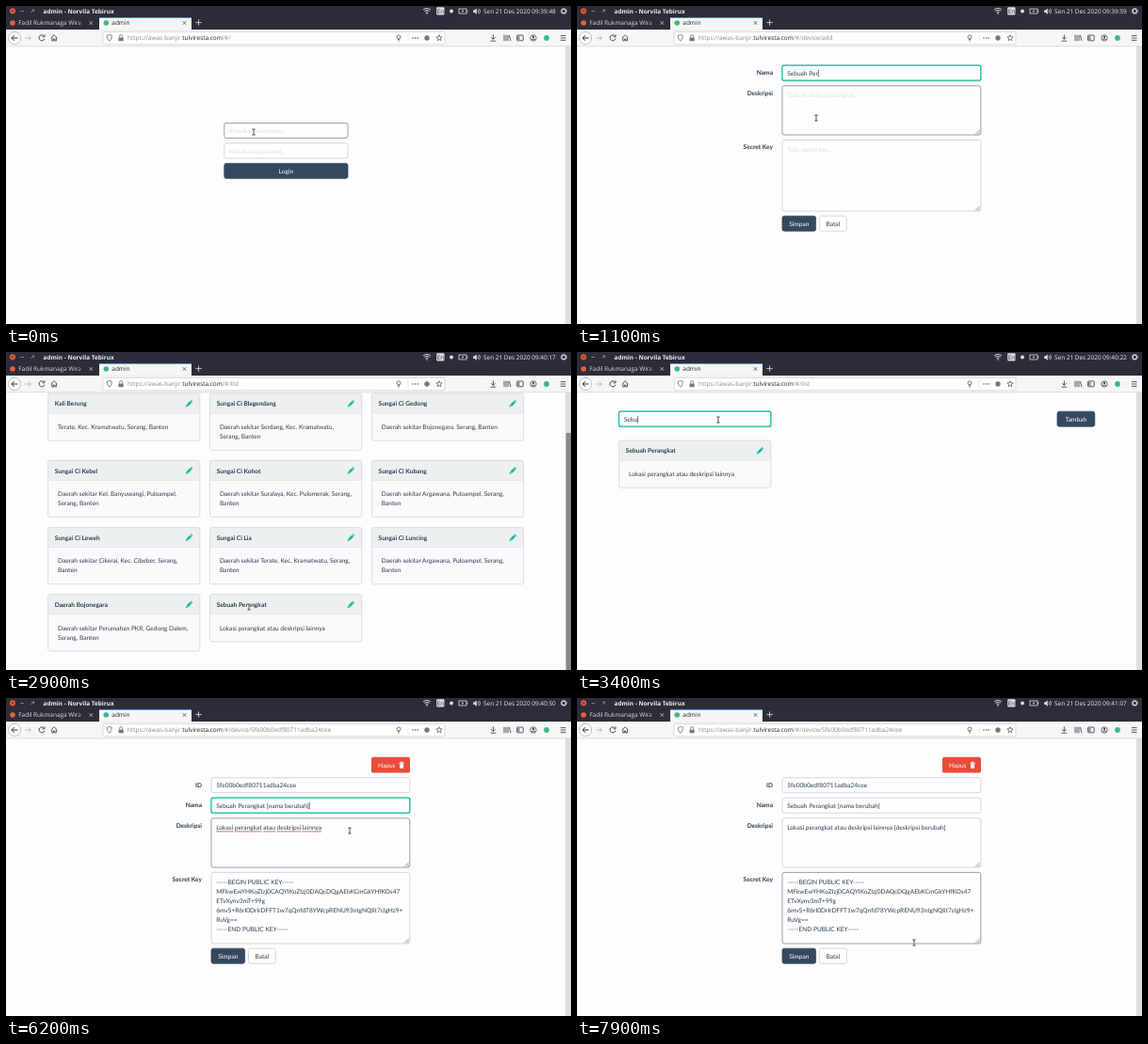
Recreate the animation shown at these times as an HTML page. Size 600x338 px, loop 8000 ms.

```html
<!DOCTYPE html>
<html lang="id">
<head>
<meta charset="utf-8">
<title>admin</title>
<style>
html, body { margin: 0; width: 100%; height: 100%; overflow: hidden; background: #fdfcfe; }
svg { display: block; width: 600px; height: 338px; }
text { font: 6.6px Lato, sans-serif; fill: #2c3e50; white-space: pre; text-rendering: geometricPrecision; }
.ui { font: 6.45px "Open Sans", "Noto Sans", sans-serif; }
.bold { font-weight: 700; }
</style>
</head>
<body>
<svg viewBox="0 0 600 338"><g id="page"></g><g id="chrome"></g><g id="mouse"></g></svg>
<script>
const LOOP = 8000, STEP = 100;
const INK = '#2c3e50', NAVY = '#34495e', TEAL = '#1abc9c', RED = '#e74c3c', BAR = '#2d2c38', ICON = '#4a4a52';
const HOST = ['https://awas-banjir.', 'tulviresta.com'];
const ID = '5fe00b0edf80711adba24cee';
const NAME = 'Sebuah Perangkat', DESC = 'Lokasi perangkat atau deskripsi lainnya';
const NAME_NEW = NAME + ' [nama berubah]', DESC_NEW = DESC + ' [deskripsi berubah]';
const KEY = ['-----BEGIN PUBLIC KEY-----',
  'MFkwEwYHKoZIzj0CAQYIKoZIzj0DAQcDQgAEbKCmGkYHfKOs47',
  'ETvXynv3mT+99g',
  '6mvS+R6rI0DrIrDFFT1w7qQnfd78YWcpRENU93ntgNQIit7clgHz9+',
  'RuVg==', '-----END PUBLIC KEY-----'].join('\n');

const CARDS = [
  ['Kali Berung', 'Terate, Kec. Kramatwatu, Serang, Banten'],
  ['Sungai Ci Blagendang', 'Daerah sekitar Serdang, Kec. Kramatwatu,\nSerang, Banten'],
  ['Sungai Ci Gedong', 'Daerah sekitar Bojonegara, Serang, Banten'],
  ['Sungai Ci Kebel', 'Daerah sekitar Kel. Banyuwangi, Puloampel,\nSerang, Banten'],
  ['Sungai Ci Kohot', 'Daerah sekitar Suralaya, Kec. Pulomerak, Serang,\nBanten'],
  ['Sungai Ci Kubang', 'Daerah sekitar Argawana, Puloampel, Serang,\nBanten'],
  ['Sungai Ci Leweh', 'Daerah sekitar Cikerai, Kec. Cibeber, Serang,\nBanten'],
  ['Sungai Ci Lia', 'Daerah sekitar Terate, Kec. Kramatwatu, Serang,\nBanten'],
  ['Sungai Ci Luncing', 'Daerah sekitar Argawana, Puloampel, Serang,\nBanten'],
  ['Daerah Bojonegara', 'Daerah sekitar Perumahan PKR, Gedong Dalem,\nSerang, Banten']
];

// Pointer path: time, x, y
const PATH = [[0, 263, 134], [400, 263, 134], [600, 297, 176], [700, 297, 176], [800, 526, 72],
  [900, 400, 90], [1000, 254, 119], [2400, 254, 119], [2500, 236, 232], [2700, 240, 236],
  [2900, 258, 271], [3100, 258, 271], [3200, 150, 72], [3600, 150, 72], [3800, 194, 103],
  [4500, 194, 103], [4800, 300, 220], [5000, 236, 274], [5200, 345, 150], [5500, 345, 150],
  [5700, 365, 115], [5900, 365, 115], [6000, 365, 141], [6700, 365, 141], [6900, 236, 274],
  [7100, 300, 270], [7300, 366, 268], [7500, 366, 268], [7700, 358, 260], [8000, 358, 260]];

const pen = document.createElement('canvas').getContext('2d');
const measure = s => { pen.font = '66px Lato, sans-serif'; return pen.measureText(s).width / 10; };
const esc = s => s.replace(/&/g, '&amp;').replace(/</g, '&lt;');
const clamp = v => Math.min(1, Math.max(0, v));
const ramp = (t, a, b) => clamp((t - a) / (b - a));
const typed = (s, t, a, b) => s.slice(0, Math.round(s.length * ramp(t, a, b)));

const rect = (x, y, w, h, fill, extra = '') =>
  `<rect x="${x}" y="${y}" width="${w}" height="${h}" fill="${fill}" ${extra}/>`;
const text = (s, x, y, extra = '') => `<text x="${x}" y="${y}" ${extra}>${esc(s)}</text>`;
const line = (d, stroke = ICON, w = 0.9, extra = '') =>
  `<path d="${d}" fill="none" stroke="${stroke}" stroke-width="${w}" ${extra}/>`;
const shape = (d, fill, extra = '') => `<path d="${d}" fill="${fill}" ${extra}/>`;
const dot = (x, y, r, fill, extra = '') => `<circle cx="${x}" cy="${y}" r="${r}" fill="${fill}" ${extra}/>`;
const cross = (x, y, r, c, w) => line(`M${x - r} ${y - r}l${2 * r} ${2 * r}m0 ${-2 * r}l${-2 * r} ${2 * r}`, c, w);

let mouse = { x: 0, y: 0 }, overField = false;

function pointerAt(t) {
  const i = Math.max(1, PATH.findIndex(p => p[0] > t));
  const [a, b] = [PATH[i - 1], PATH[i]], k = ramp(t, a[0], b[0]);
  return { x: a[1] + (b[1] - a[1]) * k, y: a[2] + (b[2] - a[2]) * k };
}

function field({ x, y, w, h, value = '', hint = '', focus, spell, grip }) {
  const hover = mouse.x > x && mouse.x < x + w && mouse.y > y && mouse.y < y + h;
  overField = overField || hover;
  let out = focus ? rect(x, y, w, h, 'none', `rx="2.2" stroke="${TEAL}" stroke-opacity=".25" stroke-width="2.6"`) : '';
  out += rect(x, y, w, h, '#fefdff',
    `rx="2" stroke="${focus ? TEAL : hover ? '#7f8a93' : '#c9ced3'}" stroke-width="${focus ? 1.2 : 0.8}"`);
  const base = y + (grip ? 12.5 : 10.7), lines = value.split('\n');
  if (!value && hint) out += text(hint, x + 5.2, base, 'style="fill:#dcdee2"');
  lines.forEach((s, i) => out += text(s, x + 5.2, base + i * 9.95));
  if (spell) {
    let from = 0;
    for (const word of value.split(' ')) {
      const left = x + 5.2 + measure(value.slice(0, from));
      if (word) out += line(`M${left} ${base + 1.6}h${measure(word)}`, '#e0303a', 0.9, 'stroke-dasharray="1.5 .35"');
      from += word.length + 1;
    }
  }
  if (focus) {
    const cx = x + 5.6 + measure(lines[lines.length - 1]);
    out += line(`M${cx} ${base - 6 + (lines.length - 1) * 9.95}v7.6`, '#222', 0.6);
  }
  if (grip) out += line(`M${x + w - 1} ${y + h - 5.5}l-5 5M${x + w - 1} ${y + h - 3.6}l-3 3M${x + w - 1} ${y + h - 1.8}l-1.2 1.2`, '#8b8b90', 0.7);
  return out;
}

const button = (s, x, y, w, fill, ink = '#fff', border = fill) =>
  rect(x, y, w, 16, fill, `rx="2.2" stroke="${border}" stroke-width=".8"`) +
  text(s, x + w / 2, y + 10.8, `text-anchor="middle" style="fill:${ink}"`);
const label = (s, y) => text(s, 208, y, 'class="bold" text-anchor="end"');

function loginPage(t) {
  const box = { x: 231.8, w: 131.2, h: 16 };
  return field({ ...box, y: 124.4, hint: 'Masukan username...', value: typed('admin', t, 100, 300), focus: t >= 100 && t < 400 }) +
    field({ ...box, y: 145.9, hint: 'Masukan password...', value: typed('••••••••', t, 400, 600), focus: t >= 400 }) +
    button('Login', 231.8, 167.3, 131.2, NAVY);
}

function formRows(top, f) {
  const box = { x: 218, w: 210.8 };
  return label('Nama', top + 10) +
    field({ ...box, y: top, h: 16, hint: 'Tulis nama perangkat...', value: f.name, focus: f.focus === 'name' }) +
    label('Deskripsi', top + 31.4) +
    field({ ...box, y: top + 21.6, h: 52.2, hint: 'Tulis deskripsi perangkat...', value: f.desc, focus: f.focus === 'desc', spell: f.spell, grip: true }) +
    label('Secret Key', top + 89) +
    field({ ...box, y: top + 79.2, h: 75.6, hint: 'Tulis secret key...', value: f.key, focus: f.focus === 'key', grip: true }) +
    button('Simpan', 218, top + 160, 35.6, NAVY) +
    button('Batal', 257.4, top + 160, 29, '#fefdff', INK, '#c9ced3');
}

function addPage(t) {
  return formRows(63.2, {
    name: typed(NAME, t, 900, 1220), desc: typed(DESC, t, 1300, 2100), key: t >= 2400 ? KEY : '',
    focus: t < 1000 ? '' : t < 1300 ? 'name' : t < 2200 ? 'desc' : t < 2600 ? 'key' : '',
    spell: t >= 1300
  });
}

function devicePage(t) {
  const again = t >= 7500, loaded = again ? t >= 7600 : t >= 4400;
  const trash = shape('M417.4 68.7h5.4v1h-5.4zM418.9 67.8h2.4v1h-2.4zM417.9 70.2h4.4l-.4 4.6h-3.6z', '#fff');
  const editing = !again && t >= 5300;
  return rect(388, 62.8, 41, 16.8, RED, 'rx="2.2"') + text('Hapus', 395, 73.8, 'style="fill:#fff"') + trash +
    label('ID', 94.7) + field({ x: 218, y: 84.7, w: 210.8, h: 16, value: ID }) +
    formRows(106.2, {
      name: !loaded ? '' : again ? NAME_NEW : NAME + typed(' [nama berubah]', t, 5800, 6150),
      desc: !loaded ? '' : again ? DESC_NEW : DESC + typed(' [deskripsi berubah]', t, 6350, 6800),
      key: loaded ? KEY : '', spell: editing,
      focus: !editing ? '' : t < 5700 ? 'desc' : t < 6300 ? 'name' : t < 6900 ? 'desc' : ''
    });
}

function card([title, body], x, y) {
  const lines = body.split('\n'), h = 50.3 + (lines.length - 1) * 10;
  const pencil = `<g transform="translate(${x + 149.5} ${y + 11.2}) rotate(45) scale(1.1)">` +
    rect(-1.2, -2.9, 2.4, 5, TEAL) + rect(-1.2, -4.3, 2.4, 1, TEAL) + shape('M-1.2 2.4h2.4l-1.2 2z', TEAL) + '</g>';
  return rect(x, y, 161.2, h, '#fbf9fc', 'rx="2"') + rect(x, y, 161.2, 21.2, '#ecf0f1', 'rx="2"') +
    rect(x, y, 161.2, h, 'none', 'rx="2" stroke="#d3d8dc" stroke-width=".8"') +
    line(`M${x} ${y + 21.2}h161.2`, '#dde1e4', 0.6) +
    text(title, x + 7.2, y + 13.3, 'class="bold"') + pencil +
    lines.map((s, i) => text(s, x + 10.4, y + 38 + i * 10)).join('');
}

function listPage(t) {
  const query = t > 3000 && t < 4200 ? typed('Sebuah', t, 3200, 3500) : '';
  const all = CARDS.slice();
  if (t >= 7000) all.push([NAME_NEW, DESC + ' [deskripsi\nberubah]']);
  else if (t >= 2700) all.push([NAME, DESC]);
  const shown = all.filter(c => c[0].startsWith(query));
  let scroll = 0;
  if (t >= 2700 && t < 4200) scroll = 50 * (ramp(t, 2700, 2900) - ramp(t, 3000, 3200));
  if (t >= 7000) scroll = 50 * ramp(t, 7000, 7200);
  const top = 94 - scroll;
  const content = field({ x: 44.6, y: 63.2 - scroll, w: 161.2, h: 16, hint: 'Cari perangkat...', value: query, focus: t >= 3200 && t < 4200 }) +
    button('Tambah', 510, 63.2 - scroll, 39.8, NAVY) +
    shown.map((c, i) => card(c, 44.6 + (i % 3) * 171.9, top + Math.floor(i / 3) * 71.2)).join('');
  const thumb = shown.length > 9 ? rect(594.7, 43 + scroll * 0.86, 5.3, 252, '#88888b', 'rx="1"') : '';
  return { content, thumb };
}

function route(t) {
  if (t < 700) return ['login', ''];
  if (t < 900 || t >= 2700 && t < 4100 || t >= 7000 && t < 7500) return ['list', 'list'];
  if (t < 2700) return ['add', 'device/add'];
  return ['device', 'device/' + ID];
}

function topPanel(t) {
  const clock = new Date(Date.UTC(2020, 11, 21, 9, 39, 48) + t * 10).toISOString().slice(11, 19);
  const pale = '#dcdbe0', white = 'style="fill:#eceaf0"';
  const arc = r => `M${447 - r} ${8 - r}q${r} ${-r * 0.8} ${2 * r} 0`;
  return rect(0, 0, 600, 25.5, BAR) +
    dot(7, 5.3, 3.1, '#e2583e') + cross(7, 5.3, 1.1, '#5b2118', 0.7) +
    line('M15.5 5.5h3.4M26.5 7l3-3m-2 0h2v2', '#a9a8b0', 0.7) +
    text('admin - Norvila Tebirux', 39.5, 7.7, `class="ui bold" ${white}`) +
    line(arc(1.4) + arc(2.7) + arc(4), pale, 0.9) + dot(447, 8, 0.8, pale) +
    rect(457.2, 1.2, 8.3, 8.4, pale, 'rx="1"') + text('En', 461.4, 7.6, 'class="ui" text-anchor="middle"') +
    dot(473, 5.5, 2, pale) +
    rect(481, 3, 8, 5, 'none', `stroke="${pale}" stroke-width=".8"`) + rect(489.2, 4.4, 1, 2.2, pale) + shape('M485.6 3.6l-2 2.2h1.3l-.6 1.8 2-2.4h-1.2z', pale) +
    shape('M496.2 4.3h1.6l2-1.9v6.6l-2-1.9h-1.6z', pale) + line('M501 4q1.2 1.6 0 3.2M502.4 2.8q2.4 2.8 0 5.6', pale, 0.8) +
    text('Sen 21 Des 2020 ' + clock, 507, 7.7, `class="ui" ${white}`) +
    dot(592.3, 5.4, 2.1, 'none', `stroke="${pale}" stroke-width="1.1"`) +
    dot(592.3, 5.4, 3.1, 'none', `stroke="${pale}" stroke-width="1" stroke-dasharray="1.22"`);
}

function tabs() {
  return dot(7, 18, 2.8, '#e8603a') +
    '<defs><linearGradient id="fade" x1="0" x2="1"><stop offset="0" stop-color="#2d2c38" stop-opacity="0"/><stop offset="1" stop-color="#2d2c38"/></linearGradient></defs>' +
    text('Fadil Rukmanaga Wira', 13.3, 20.4, 'class="ui" style="fill:#dad9df"') +
    rect(76, 12, 9, 13, 'url(#fade)') + rect(85, 12, 13, 13, BAR) +
    cross(90.3, 18, 1.8, '#c9c8ce', 0.8) +
    rect(99, 12, 98, 13.6, '#f5f6f7') + rect(99, 12, 98, 0.9, '#3b8ede') +
    dot(106.3, 18, 2.8, '#41b883') + text('admin', 112.3, 20.4, 'class="ui" style="fill:#222228"') +
    cross(189.5, 18, 1.8, ICON, 0.8) + line('M201.4 17.6h6.4M204.6 14.4v6.4', '#d2d1d8', 0.9);
}

function navBar(path) {
  const [sub, host] = HOST;
  const star = Array.from({ length: 10 }, (_, i) => {
    const a = i * Math.PI / 5, r = i % 2 ? 1.5 : 3.3;
    return (460 + r * Math.sin(a)).toFixed(2) + ' ' + (34 - r * Math.cos(a)).toFixed(2);
  }).join('L');
  return rect(0, 25.2, 600, 17.8, '#f5f6f7') + line('M0 42.8h600', '#d2d1d6', 0.7) +
    dot(9, 34, 6.6, '#fdfdfe', 'stroke="#a9a9b0" stroke-width=".7"') + line('M12.5 34h-6.6m2.8-2.8l-2.8 2.8 2.8 2.8', '#333339', 1) +
    line('M20 34h6.4m-2.8-2.8l2.8 2.8-2.8 2.8', '#b6b6bc', 0.9) +
    line('M40.4 32a3 3 0 1 0 .5 2.8M41 30.4v2.4h-2.4', ICON, 1) +
    line('M47.8 34l3.3-3.2 3.3 3.2M48.8 33.4v3.6h1.6v-2h1.4v2h1.6v-3.6', ICON, 0.9) +
    rect(103, 27.4, 363, 13.4, '#fefeff', 'rx="1.5" stroke="#cfcfd4" stroke-width=".7"') +
    line('M107.2 31.4l2.6-1 2.6 1q0 4.2-2.6 6-2.6-1.8-2.6-6z', '#6d6d74', 0.8) +
    rect(119.5, 33.4, 5.2, 3.8, '#77777e', 'rx=".5"') + line('M120.6 33.4v-1.4a1.5 1.5 0 0 1 3 0v1.4', '#77777e', 0.8) +
    `<text class="ui" x="129" y="36.4" style="fill:#8a8a90">${sub}<tspan style="fill:#222228">${host}</tspan>/#/${path}</text>` +
    dot(417, 33, 2, 'none', `stroke="${ICON}" stroke-width=".7"`) + line('M416 35.5h2M416.2 37h1.6', ICON, 0.8) +
    line('M427 30v8', '#dedee2', 0.6) + [432, 434.6, 437.2].map(x => dot(x, 34, 0.75, ICON)).join('') +
    dot(447, 34, 2.7, '#77777e') + line(`M${star}Z`, ICON, 0.7) +
    line('M517.4 30.4v5m-2.2-2.2l2.2 2.2 2.2-2.2M514.6 37.2h5.6', ICON, 0.9) +
    line('M529 30.8v6.4M531 30.8v6.4M533 30.8v6.4M534.4 31l1.6 6.2', ICON, 0.9) +
    rect(542.6, 31, 6.6, 5.8, 'none', `rx=".7" stroke="${ICON}" stroke-width=".9"`) + rect(543, 31.4, 2.6, 5, '#94949b') +
    dot(560, 34, 3.2, 'none', `stroke="${ICON}" stroke-width=".8"`) + dot(560, 33, 1.2, ICON) + line('M558 36q2-2 4 0', ICON, 0.9) +
    dot(574, 34, 2.9, '#41b883') + line('M588.9 31.6h5.6m-5.6 2.4h5.6m-5.6 2.4h5.6', ICON, 0.9);
}

function statusBar() {
  return rect(0, 329, 221.5, 9, '#efeef2') + line('M0 329h221.5v9', '#d6d5da', 0.6) +
    text(HOST.join('') + '/#/device/' + ID, 1.2, 335.8, 'class="ui" style="fill:#85858b"');
}

function pointer(ibeam) {
  const { x, y } = mouse;
  if (!ibeam) return shape(`M${x} ${y - 3}v7.4l1.7-1.6 1.3 2.8 1.2-.6-1.3-2.7h2.3z`, '#111', 'stroke="#fff" stroke-width=".5"');
  const d = `M${x - 1.6} ${y - 3}h3.2M${x} ${y - 3}v6M${x - 1.6} ${y + 3}h3.2`;
  return line(d, '#fff', 1.8) + line(d, '#222', 0.8);
}

const layer = id => document.getElementById(id);
function render(t) {
  mouse = pointerAt(t);
  overField = false;
  const [page, path] = route(t);
  const view = page === 'list' ? listPage(t)
    : { content: { login: loginPage, add: addPage, device: devicePage }[page](t), thumb: '' };
  const hovering = t >= 3800 && t < 4500;
  layer('page').innerHTML = rect(0, 43, 600, 295, '#fdfcfe') + view.content +
    rect(594, 43, 6, 295, '#dfdde1') + view.thumb + (hovering ? statusBar() : '');
  layer('chrome').innerHTML = topPanel(t) + tabs() + navBar(path);
  const onLink = page === 'list' && (hovering || t >= 7300 || t === 800);
  layer('mouse').innerHTML = pointer(overField || page === 'list' && !onLink);
}

let last = -1;
function tick() {
  const t = Math.floor(performance.now() % LOOP / STEP) * STEP;
  if (t !== last) render(last = t);
  requestAnimationFrame(tick);
}
tick();
</script>
</body>
</html>
```
